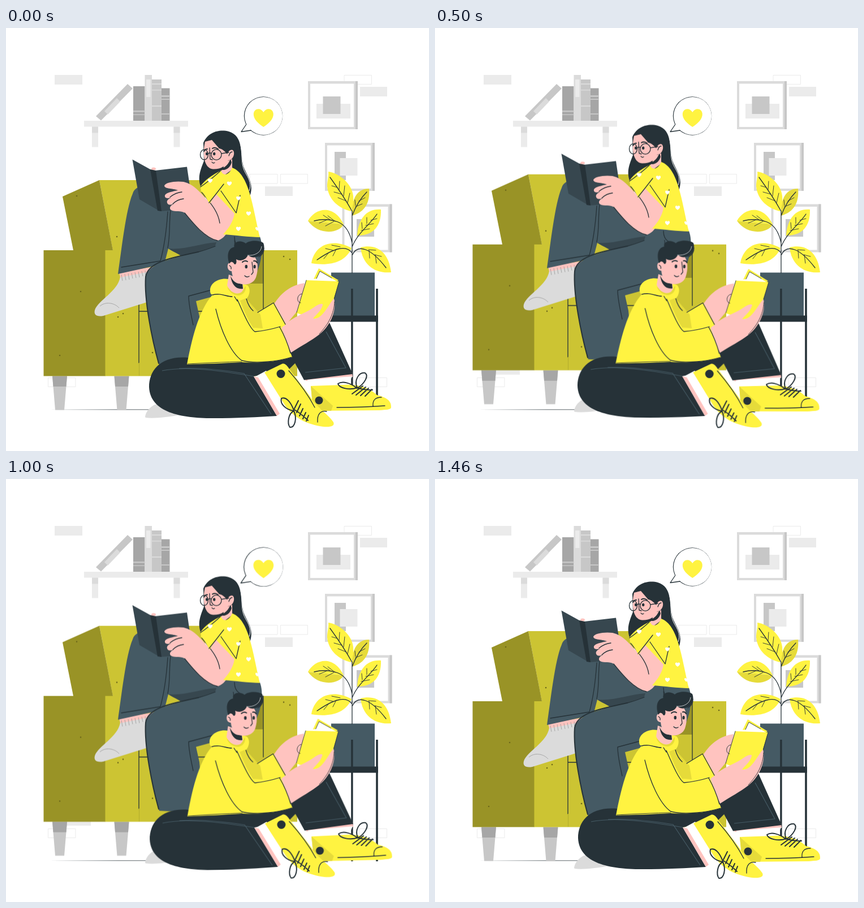
These frames come from a looping animation (748x748 px, 1500 ms). An HTML page without scripts:

```html
<!DOCTYPE html>
<html lang="en">
<head>
<meta charset="utf-8">
<title>Reading together</title>
<style>
html, body { margin: 0; width: 100%; height: 100%; overflow: hidden; background: #fff; }
svg { display: block; width: 100vw; height: 100vh; }
.yellow { fill: #fff341; } .shade { fill: #e6db3a; }
.olive { fill: #ccc433; } .moss { fill: #999326; }
.skin { fill: #ffc3bf; } .ink { fill: #263238; } .slate { fill: #37474f; } .denim { fill: #455a64; }
.g1 { fill: #ebebeb; } .g2 { fill: #dbdbdb; } .g3 { fill: #c7c7c7; } .g4 { fill: #a6a6a6; }
.white { fill: #fff; }
.line { fill: none; stroke: #263238; stroke-width: 1.3; stroke-linecap: round; stroke-linejoin: round; }
.fine { stroke-width: .9; }
.bold { stroke-width: 2; }
.seam { fill: none; stroke: #455a64; stroke-width: 1.2; }
.tile { fill: none; stroke: #ebebeb; }
#couch { animation: float 1.5s linear infinite; }
#man { transform-origin: 467px 542px; animation: sway 1.5s linear infinite; }
#bubble { transform-origin: 454px 155.5px; animation: beat 1.5s linear infinite; }
@keyframes float { 0%, 97.2%, 100% { transform: none; } 48.6% { transform: translateY(-15px); } }
@keyframes sway {
  0%, 97.2%, 100% { transform: rotate(0deg); }
  24.3% { transform: rotate(1deg); }
  72.9% { transform: rotate(-1deg); }
}
@keyframes beat { 0%, 64.8%, 94%, 100% { transform: scale(1); } 74.5% { transform: scale(1.1); } }
</style>
</head>
<body>
<svg viewBox="0 0 748 748">
<defs>
  <path id="heart" d="M0 17C-9 11 -18 3 -17.500 -6C-17 -16 -5 -18 0 -9C5 -18 17 -16 17.500 -6C18 3 9 11 0 17Z"/>
  <g id="frame">
    <path class="g2" d="M0 0H88V85H0Z"/><path class="g3" d="M84 0H88V85H84Z"/><path class="white" d="M4 4.500H81V81H4Z"/>
  </g>
  <g id="bracket"><path class="g1" d="M0 0H11V36H0Z"/><path class="g2" d="M0 0H11V11H0Z"/></g>
  <g id="sofaLeg"><path class="g3" d="M0 0H26L21 60H5Z"/><path class="g4" d="M0 0H26L24.500 18.500H1.500Z"/></g>
</defs>

<g id="wall">
  <path class="g1" d="M86 83H135V100H86ZM626 104H674V121H626ZM458 280H507V297H458ZM102 597H150V613H102Z"/>
  <path class="tile" d="M598 83.500H646.500V99.500H598ZM431 258.500H480V275H431ZM485.500 258.500H533.500V275H485.500ZM74.500 618.500H123V634.500H74.500ZM625 618.500H673.500V634.500H625Z"/>
  <path class="g1" d="M138 164H322V174.500H138Z"/>
  <use href="#bracket" x="152" y="174.500"/><use href="#bracket" x="296.500" y="174.500"/>
  <path class="g3" d="M159 156L215 99L224 107L168 163.500Z"/><path class="g2" d="M174 147L196 124L202 130L180 153Z"/>
  <path class="g4" d="M225 103H245.500V164H225ZM275 106.500H289.500V164H275Z"/>
  <path class="g2" d="M245.500 83H258V164H245.500Z"/><path class="g1" d="M248 91H255.500V122H248Z"/>
  <path class="g3" d="M258 91H275V164H258ZM225 146H245.500V148.500H225ZM225 152.500H245.500V154H225ZM275 119H289.500V122H275ZM275 125H289.500V127H275ZM275 151H289.500V153H275Z"/>
  <path class="g2" d="M258 98H275V100H258ZM258 109H275V110.500H258ZM258 137H275V139H258Z"/>
  <use href="#frame" x="534" y="94"/>
  <path class="g1" d="M549 134H609V160H549Z"/><path class="g3" d="M560.500 121H591.500V152H560.500Z"/>
  <use href="#frame" x="564" y="203"/>
  <path class="g3" d="M581 219H601V269H581Z"/><path class="g1" d="M590.500 230H621.500V261H590.500Z"/>
  <use href="#frame" x="594.500" y="311.500"/>
  <path class="g3" d="M620 338H651V369H620Z"/>
  <path class="ink" d="M74 675L200 674.500H270V675.300H200Z"/>
</g>

<g id="plant">
  <path class="denim" d="M575 432.500H652V510H575Z"/>
  <path class="ink" d="M572 508.500H658V519.500H572ZM610.200 461H613.600V676H610.200ZM654.200 461H657.800V676H654.200Z"/>
  <path class="shade" d="M642 284C621 284 610 302 612 332C636 325 644 307 642 284Z"/>
  <path class="yellow" d="M570 254C590 257 612 276 614 297C615 309 613 317 610 324C589 319 570 304 568 280C568 270 571 262 570 254Z
    M663 321C638 319 623 337 621 367C650 367 664 350 663 321Z
    M540 416C545 385 575 370 611 389C600 416 570 421 540 416Z
    M627 388C654 381 677 395 681 432C652 435 630 418 627 388Z
    M534 341C546 319 579 310 597 347Z"/>
  <path class="shade" d="M534 341L597 347C590 363 553 368 534 341Z"/>
  <path class="line" d="M612 433V324C602 306 586 282 573 264M612 332C618 316 628 300 638 290M612 387C622 362 645 346 656 329M612 380C608 360 599 348 587 343C573 338 557 338 545 341M612 398C602 383 580 389 550 410M612 402C622 380 646 390 672 424"/>
  <path class="line fine" d="M604 309L608 292M597 297L599 279M589 286L590 271M602 306L587 300M594 294L580 290M586 282L576 279M618 316L630 311M624 306L635 300M618 314L617 304M628 358L643 355M636 349L650 346M645 340L656 337M630 355L629 344M638 346L638 335M582 342L569 332M573 339L561 331M580 342L565 350M568 339L554 345M591 387L576 384M578 393L565 390M584 391L578 403M571 397L562 408M641 392L654 393M652 401L664 404M642 393L643 407M653 401L655 416"/>
</g>

<g id="bubble">
  <circle class="ink" cx="455" cy="155.500" r="34.200"/>
  <circle class="white" cx="455.500" cy="155.500" r="33.600"/>
  <path class="white" d="M430 165L425 171L416 183.500L432 181L440 175Z"/>
  <path class="line" d="M424.500 171L416 183.500L433 181"/>
  <use href="#heart" class="yellow" x="455.300" y="158"/>
</g>

<g id="couch">
  <use href="#sofaLeg" x="82" y="615.500"/><use href="#sofaLeg" x="191.500" y="615.500"/>
  <path class="g2" d="M246 688C247 676 260 664 274 663L310 684C285 688 262 691 247 689Z"/>
  <path class="olive" d="M165 269H352V394H189Z"/>
  <path class="moss" d="M100 298L165 269L189 393H119Z"/>
  <path class="olive" d="M175 393H515V615.500H175Z"/>
  <path class="moss" d="M66.500 393H175.500V615.500H66.500ZM430 393H455V452H430Z"/>
  <path class="line" d="M235 488V592M235 501H252M335 501H400M455 393V501"/>
  <path d="M235.500 592V615" stroke="#b3ac2d"/>
  <path stroke="#6d681b" stroke-width="2.500" stroke-linecap="round" d="M95 579h.1M132 466h.1M125 297h.1M196 369h.1M207 505h.1M198 511h.1M502 409h.1M491 404h.1M259 574h.1"/>

  <g id="girl">
    <path class="g2" d="M202 440L262 427L252 484L172 509C160 511 155 507 157 499C162 482 198 466 202 440Z"/>
    <path class="skin" d="M200 432L262 422V429L202 441Z"/>
    <path fill="none" stroke="#a6a6a6" d="M166 492C176 483 192 486 200 495M204 436L206 447M210 435L212 446M216 434L218 445M222 433L224 443M228 432L230 442M234 431L236 441M240 430L242 439M246 429L247 437"/>
    <path class="denim" d="M224 293C228 278 248 275 270 285L345 325L400 372L372 389C338 406 310 406 287 390L280 417L198 435C204 395 212 320 224 293Z"/>
    <path class="slate" d="M287 390C315 393 342 381 372 379L368 391C345 397 330 400 310 403Z"/>
    <path class="line" d="M291 323C288 345 291 362 286 389M286 325C284 355 279 390 273 412L204 423"/>
    <path class="denim" d="M384 360L449 369C456 388 453 418 436 448L365 475L336 483L342 510L350 600L271 596C258 550 244 480 247 440C255 408 320 405 372 385Z"/>
    <path class="line bold" d="M270 593C258 550 244 480 247 440C251 412 300 405 340 396"/>
    <path class="line" d="M340 396Q355 392 370 386M368 462L323 474C323 490 327 505 331 525M404 369Q404 383 413 388"/>

    <path class="ink" d="M349 203C358 183 378 179 394 183C420 191 414 220 420 245C425 260 440 274 431 298C426 286 410 270 404 256L380 262L344 280C338 262 345 249 350 235Z"/>
    <path fill="none" stroke="#fff" stroke-width="1" d="M415 207C419 228 414 242 425 259C431 269 434 278 430 288"/>
    <path class="skin" d="M384 238L400 232V250L384 262L374 257L385 249Z"/>
    <path class="ink" d="M378 250C388 247 394 240 397 231L399 238C395 250 386 253 378 250Z"/>
    <path class="skin" d="M352 201C347 223 350 248 366 249.500C380 250 389 244 393 234C402 234 406 220 401 216C396 214 393 219 391 223C387 217 380 213 377 213L364 198Z"/>
    <path class="line" d="M394 226Q396 219 400 219M360 212L361 232L365 233M364 237Q366 240 369 238"/>
    <path class="line bold" d="M350 218Q352 214 356 214M365 213Q370 210 375 214"/>
    <path class="ink" d="M353 222.500a2 2.800 0 1 0 4 0a2 2.800 0 1 0 -4 0M366 222.500a2.200 2.800 0 1 0 4.400 0a2.200 2.800 0 1 0 -4.400 0"/>
    <path class="line" d="M343.500 224a7 9 0 1 0 14 0a7 9 0 1 0 -14 0M363 224a9 9.300 0 1 0 18 0a9 9.300 0 1 0 -18 0M357.500 223Q360 219 363 222M381 222L394 220"/>

    <path class="white" d="M226 233L263 246L318 243L321 248L262 254Z"/>
    <ellipse class="skin" cx="261" cy="249" rx="4" ry="2.500"/>
    <path class="slate" d="M223.500 232.500L257 251L272 324L236 303ZM264 252L320 245.500L328 300L300 322L273 324Z"/>
    <path class="ink" d="M255 250L265 252L275 324L268 323Z"/>

    <path class="skin" d="M371 290L345 288L357 306C345 292 332 276 314 272C300 270 281 273 280 279C281 285 294 283 304 287C290 290 280 292 281 298C282 302 288 301 292 300C285 303 283 307 286 311C289 314 293 312 297 311C290 314 288 319 292 322C300 326 309 322 316 327C330 345 353 373 374 376C390 372 400 348 406 328Z"/>
    <path class="line" d="M290 299Q300 291 311 290M295 311Q303 303 314 302M316 327C329 343 351 371 374 376M346 290C360 308 375 323 378 345"/>
    <path class="yellow" d="M344 280C352 268 365 260 380 252C384 264 395 259 400 247C430 258 436 315 449 370C430 370 405 366 384 365C394 354 402 342 404 328L371 293L360 311C355 302 350 292 345 289Z"/>
    <path class="line" d="M380 288L407 327L414 296M359 309L371 294L385 276M344 281Q360 270 379 253"/>
    <g class="white">
      <use href="#heart" transform="translate(361 270) scale(.24)"/><use href="#heart" transform="translate(395 275) scale(.24)"/>
      <use href="#heart" transform="translate(411 301) scale(.22)"/><use href="#heart" transform="translate(429 328) scale(.24)"/>
      <use href="#heart" transform="translate(411 355) scale(.24)"/><use href="#heart" transform="translate(444.500 355) scale(.2)"/>
    </g>
  </g>
</g>

<g id="man">
  <path class="skin" d="M528 619L612 609L613 617L530 624Z"/>
  <path class="white" d="M533 622L612 616L604 634L540 634Z"/>
  <path class="ink" d="M500 572L540 530L572 521L613 612L527 622.500Z"/>
  <path class="seam" d="M566 537L601 601L529 609"/>
  <g id="farShoe">
    <path class="yellow" d="M539 633L598 631C620 630 640 634 656 649C672 653 682 659 681 671C681 675 672 675 660 676L543 677Z"/>
    <path class="shade" d="M539 633L578 668L575 677H543Z"/>
    <circle class="ink" cx="553.500" cy="658.500" r="7"/>
    <path class="line" d="M585 671Q630 671 670 668M649 669C648 658 653 653 664 653"/>
    <path class="line bold" d="M621 637C608 627 595 624 587 629C589 637 608 641 621 636C615 623 624 608 635 610C642 615 634 629 621 637ZM612 647L631 633M619 649L636 635M627 650L641 637M635 651L647 639M621 636Q630 640 648 640"/>
  </g>
  <path class="ink" d="M322 583C274 579 253 605 253 635C255 680 310 690 365 690C410 690 445 688 479 686L438 616L500 604L522 582Z"/>
  <path class="seam" d="M276 606C320 597 385 607 438 616M306 602C340 600 385 605 421 611L469 683"/>
  <path class="white" d="M440 617L460 606L496 662L481 684Z"/>
  <path class="skin" d="M438 616L446 618L484 682L479 686Z"/>
  <g id="nearShoe">
    <path class="yellow" d="M457 609L488 594C493 592 497 597 501 603L538 652C550 672 569 682 579 697C582 704 574 706 561 705C533 701 508 690 492 665Z"/>
    <circle class="ink" cx="486" cy="611.500" r="7.500"/>
    <path class="line" d="M500 606Q530 640 546 671M551 697C550 683 556 676 567 678"/>
    <path class="line bold" d="M509 676C503 660 495 652 487 655C484 664 494 675 509 677C499 682 497 699 502 706C511 707 515 690 509 677ZM510 673L517 659M514 680L521 665M519 686L525 673M525 691L530 680M531 695L535 685M510 675Q522 682 534 694"/>
  </g>

  <g id="arms">
    <path class="skin" d="M474 488C488 466 506 454 528 451L522 492L495 525Z"/>
    <path class="white" d="M545 444L554 427L588 449L570 458Z"/>
    <path class="yellow" d="M544 444L553 425L588 446L585 448L555 430L549 443ZM531 446L589 448L579 481L545 514L514 504Z"/>
    <path class="line fine" d="M589 448L580 480M531 446L514 503M523 470C513 472 514 486 521 486M549 443L555 430L576 442"/>
    <path class="skin" d="M486 531C505 511 526 506 543 495C552 488 562 485 560 491C558 500 547 508 543 514C560 514 566 491 580 478C586 503 570 530 554 542C540 553 522 562 504 574Z"/>
    <path class="yellow" d="M560 490L580 478C568 492 560 515 543 514C548 507 558 500 560 490Z"/>
    <path class="line fine" d="M581 484C580 506 570 524 554 541"/>
  </g>
  <path class="yellow" d="M362 470C356 451 378 441 393 444L427 455C434 462 430 474 425 479L445 502L474 486L495 524L487 530L506 582C480 590 450 593 417 591C385 593 350 594 320 595C328 553 340 500 365 472Z"/>
  <path class="shade" d="M414 482L424 478L450 507L454 531L437 530Q424 510 414 482ZM391 458Q398 473 412 473Q425 470 424 456L419 463Q405 472 391 458Z"/>
  <path class="line" d="M371 497C380 535 397 574 417 588C440 594 480 590 505 582M409 480C420 505 431 531 440 537Q462 535 485 528M445 503L473 486L494 524M484 529Q496 550 503 575M365 472C380 468 389 475 400 475M404 475L409 483M425 479Q429 493 437 500"/>
  <path class="line fine" d="M321 594Q375 591 417 590"/>

  <g id="head">
    <path class="skin" d="M394 436L391 455C397 470 414 475 420 462L418 446Z"/>
    <path class="ink" d="M397 438C402 450 409 453 418 452L419 461C407 463 399 454 397 438Z"/>
    <path class="skin" d="M400 407L437 401C446 410 447 426 442 441C437 454 421 456 411 451C404 447 400 440 399 430C390 430 390 415 396 415Z"/>
    <path class="ink" d="M395 417C391 407 390 390 404 387C402 377 415 374 424 381C431 375 447 375 455 380C459 390 455 403 442 405C436 407 430 404 428 401C424 411 414 413 407 409C409 417 405 421 402 415Q398 411 395 417Z"/>
    <path class="line" d="M404 386Q405 378 404 376M447 405Q457 399 456 389M395 420Q399 422 398 426M435 414L437 432L434 436M422 438Q426 442 430 439"/>
    <path class="line bold" d="M418 414Q422 410 427 413M438 412Q442 411 444 415"/>
    <path class="ink" d="M422.500 422a2.300 3.200 0 1 0 4.600 0a2.300 3.200 0 1 0 -4.600 0M437.500 422a2.100 3.200 0 1 0 4.200 0a2.100 3.200 0 1 0 -4.200 0"/>
    <path fill="none" stroke="#fff" stroke-width=".7" d="M427 402C440 403 451 397 452 386"/>
  </g>
</g>
</svg>
</body>
</html>
```
